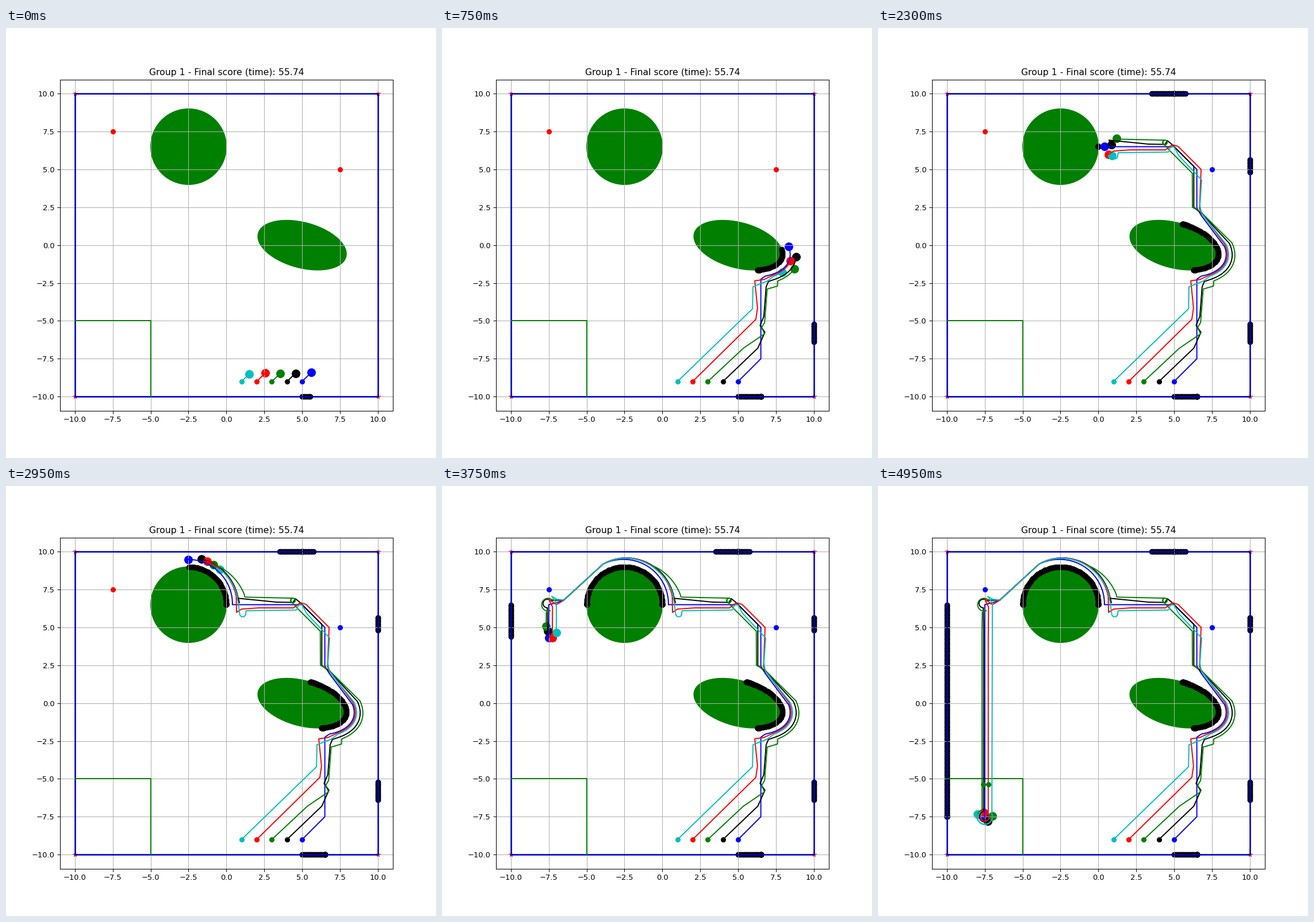
These frames come from a looping animation (748 by 748 pixels, 5000 ms). A matplotlib script:

```python
import numpy as np
import matplotlib.pyplot as plt
from matplotlib.animation import FuncAnimation
from matplotlib.patches import Circle, Ellipse

FRAMES = 100
HALF_X = 11.0
HALF_Y = HALF_X * 0.77 / 0.775
DISC, OVAL, HOME = (-2.5, 6.5), (5, 0), (-7.5, -7.5)
TILT = -15


def arc(centre, r0, r1, a0, a1):
    """Arc in degrees whose radius drifts from r0 to r1."""
    a = np.radians(np.linspace(a0, a1, 40))
    r = np.linspace(r0, r1, 40)
    return np.column_stack([centre[0] + r * np.cos(a),
                            centre[1] + r * np.sin(a)])


def around_oval(gap, a0, a1, count=40):
    """Curve that keeps a gap to the tilted ellipse."""
    a, tilt = np.radians(np.linspace(a0, a1, count)), np.radians(TILT)
    u, v = (3 + gap) * np.cos(a), (1.5 + 0.9 * gap) * np.sin(a)
    return np.column_stack([OVAL[0] + u * np.cos(tilt) - v * np.sin(tilt),
                            OVAL[1] + u * np.sin(tilt) + v * np.cos(tilt)])


def chain(*parts):
    return np.vstack([np.atleast_2d(p) for p in parts])


def make_track(legs, spans):
    """Walk each leg at an even pace in its time span, resting in between."""
    times, points = [], []
    for leg, (t0, t1) in zip(legs, spans):
        if points:
            leg = chain(points[-1][-1], leg)
        steps = np.abs(np.diff(leg, axis=0)).max(axis=1)
        way = np.concatenate([[0], np.cumsum(steps)])
        times.append(t0 + (t1 - t0) * way / way[-1])
        points.append(leg)
    return np.concatenate(times), np.vstack(points)


def leader():
    legs = [
        chain((5, -9), (6.5, -7.5), (6.5, -2.25), around_oval(0.52, -50, 23)),
        chain((6.8, 1.95), (6.5, 2.45), (6.5, 5), (5, 6.5)),
        chain((0.4, 6.5)),
        arc(DISC, 2.9, 2.99, 0, 90),
        chain(arc(DISC, 2.99, 3.03, 90, 118), (-6.58, 6.75), (-7.5, 6.5)),
        chain((-7.5, -7.49))]
    return make_track(legs, [(0, 16), (16, 28.3), (30.5, 38.8), (52, 60),
                             (60, 69), (72.1, 97.2)])


def follower(south, gap, turn, north, west, radius, lag, corner, home):
    """Round both obstacles, turn at the corner and circle at home."""
    legs = [
        chain(south, around_oval(gap, -40, turn)),
        chain(around_oval(gap, turn, 27), north),
        chain(west),
        arc(DISC, radius, 3.12, 10, 90 - lag),
        chain(arc(DISC, 3.12, 3.03, 90 - lag, 118), (-6.5, 6.8), corner),
        arc(HOME, home[0], *home)]
    return make_track(legs, [(0, 16), (16, 29), (29, 47), (51, 60),
                             (60, 76), (76, 100)])


black = follower(
    [(4, -9), (6.3, -6.8), (6.77, -5.75), (6.45, -5.3), (6.7, -4.7),
     (6.85, -2.75), (7, -2.4)],
    0.92, 6,
    [(6.95, 1.95), (6.3, 2.5), (6.3, 5.2), (4.8, 6.7)],
    [(4.55, 6.9), (4.4, 6.65), (3.3, 6.67), (0.7, 6.93), (0.86, 6.63)],
    3.3, 16,
    chain(arc((-7.6, 6.58), 0.28, 0.28, 45, 270), (-7.57, 4.77)),
    (0.35, 103, 305))

green = follower(
    [(3, -9), (5.35, -6.8), (6.75, -5.85), (6.55, -5.45), (6.75, -5.1),
     (6.92, -2.9), (7.6, -2.7)],
    1.1, -13,
    [(6.75, 2.2), (6.21, 2.5), (6.2, 4.75), (4.7, 6.25)],
    chain(arc((4.4, 6.78), 0.15, 0.15, 200, -270), (1.26, 7), (1.2, 7.05)),
    3.75, 32,
    chain(arc((-7.55, 6.5), 0.42, 0.42, 50, 290), (-7.66, 6), (-7.68, 5.07)),
    (0.5, 111, 366))

red = follower(
    [(2, -9), (6.17, -4.9), (6.28, -4.15), (6.1, -2.35), (6.7, -2.27)],
    0.6, -3,
    [(6.93, 1.95), (6.68, 2.4), (6.78, 5), (5.26, 6.52)],
    [(4.88, 6.63), (4.43, 6.29), (2.15, 6.29), (1, 6.21), (0.67, 5.99)],
    3.2, 23,
    [(-7, 6.5), (-7.5, 6.87), (-7.25, 6.35), (-7.27, 4.32)],
    (0.3, 40, -260))

cyan = follower(
    [(1, -9), (5.95, -4.2), (5.98, -2.75), (6.93, -2.37)],
    0.68, -27,
    [(6.8, 2.1), (6.7, 2.65), (6.82, 4.3), (5.3, 5.92)],
    chain(arc((4.9, 6.3), 0.2, 0.2, 60, 200), (4.6, 6.15), (1.3, 6.1),
          arc((1.08, 5.9), 0.2, 0.2, 0, -180)),
    3.27, 42,
    [(-7, 6.87), (-7.3, 7.05), (-7, 6.6), (-7, 4.65)],
    (0.5, 20, -201))


def position(track, t):
    times, xy = track
    return np.column_stack([np.interp(t, times, xy[:, k]) for k in (0, 1)])


def trail(track, t):
    times, xy = track
    return chain(xy[times < t], position(track, [t]))


def contacts(points):
    """Nearest point on any wall or obstacle for each position."""
    rim = chain(arc(DISC, 2.5, 2.5, 0, 360), around_oval(0, 0, 360, 1441))
    found = []
    for x, y in points:
        out = np.array([x, y]) - DISC
        on_disc = DISC + 2.5 * out / np.hypot(*out)
        on_oval = rim[np.argmin(np.hypot(rim[:, 0] - x, rim[:, 1] - y))]
        options = [on_disc, on_oval, (-10, y), (10, y), (x, -10), (x, 10)]
        found.append(min(options, key=lambda p: np.hypot(p[0] - x, p[1] - y)))
    return np.array(found)


fig, ax = plt.subplots(figsize=(8, 8), dpi=93.5)
fig.subplots_adjust(left=0.125, right=0.9, bottom=0.11, top=0.88)
ax.set_xlim(-HALF_X, HALF_X)
ax.set_ylim(-HALF_Y, HALF_Y)
ax.set_title("Group 1 - Final score (time): 55.74")
ax.grid(True)

ax.add_patch(Circle(DISC, 2.5, color="g"))
ax.add_patch(Ellipse(OVAL, 6, 3, angle=TILT, color="g"))
ax.plot([-10, 10, 10, -10], [-10, -10, 10, 10], "r*", zorder=1.4)
ax.plot([-10, 10, 10, -10, -10], [-10, -10, 10, 10, -10], "mediumblue", lw=2)
ax.plot([-10, -5, -5], [-5, -5, -10], "g")

tracks = [leader(), black, green, red, cyan]

# The leader senses its surroundings every tenth of a second.
sense_times = np.arange(0, FRAMES, 0.1794)
sense_points = position(tracks[0], sense_times)
touched = contacts(sense_points)
touch_dots, = ax.plot([], [], "ko", ms=6.5, zorder=1.1)

lines, heads = [], []
for track, colour in zip(tracks, "bkgrc"):
    lines += ax.plot([], [], color=colour)
    heads += ax.plot([], [], "o", color=colour, ms=10.5, zorder=1.2)
    ax.plot(*track[1][0], "o", color=colour)

targets = [(ax.plot(*spot, "ro")[0], spot) for spot in ((7.5, 5), (-7.5, 7.5))]
arrivals = [(ax.plot(x, -5.35, "go")[0], track)
            for x, track in ((-7.62, black), (-7.27, red))]


def update(frame):
    t = frame + 1
    seen = sense_times <= t
    touch_dots.set_data(*touched[seen].T)
    for track, line, head in zip(tracks, lines, heads):
        path = trail(track, t)
        line.set_data(*path.T)
        head.set_data(path[-1:, 0], path[-1:, 1])
    for dot, spot in targets:
        gap = np.hypot(*(sense_points[seen] - spot).T).min()
        dot.set_color("b" if gap <= 1.05 else "r")
    for dot, track in arrivals:
        x, y = position(track, [t])[0]
        dot.set_visible(x < -5 and y < -5.35)
    return [touch_dots, *lines, *heads]


anim = FuncAnimation(fig, update, frames=FRAMES, interval=50,
                     init_func=lambda: update(0), repeat=True, repeat_delay=0)
plt.show()
```
